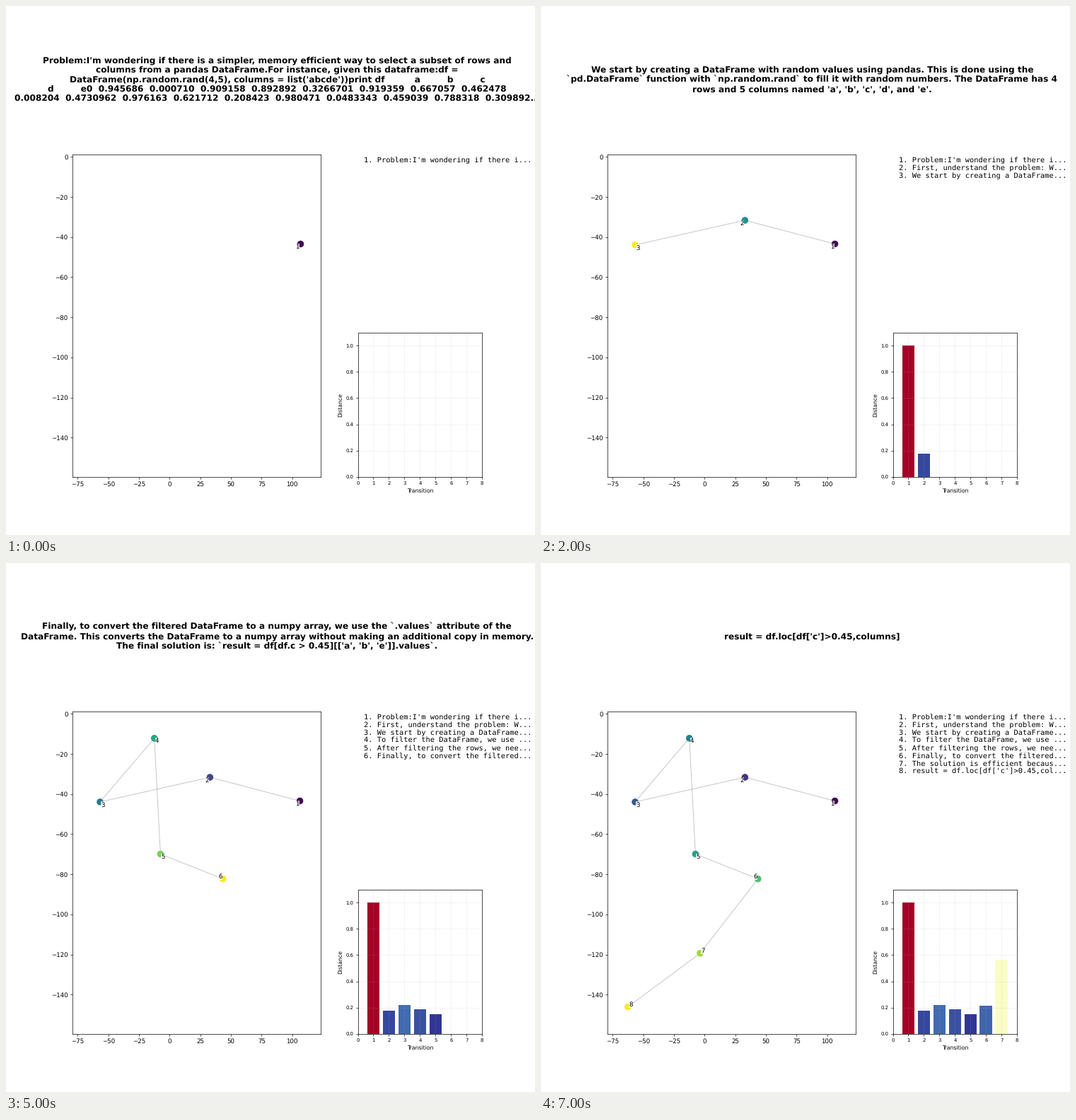
Recreate the animation shown at these times as a matplotlib script. Size 748x748 px, loop 8000 ms.

```python
import numpy as np
import matplotlib.pyplot as plt
from matplotlib.animation import FuncAnimation

SIDE = 748
np.random.seed(0)
plt.rcParams["font.family"] = "DejaVu Sans"
plt.rcParams["text.hinting"] = "none"

STEPS = [
    "Problem:I'm wondering if there is a simpler, memory efficient way to select a subset of rows and\n"
    "columns from a pandas DataFrame.For instance, given this dataframe:df =\n"
    "DataFrame(np.random.rand(4,5), columns = list('abcde'))print df          a         b         c\n"
    "d         e0  0.945686  0.000710  0.909158  0.892892  0.3266701  0.919359  0.667057  0.462478\n"
    "0.008204  0.4730962  0.976163  0.621712  0.208423  0.980471  0.0483343  0.459039  0.788318  0.309892...",
    "First, understand the problem: We have a DataFrame with random values and we need to filter rows\n"
    "where the value in column 'c' is greater than 0.45. After filtering, we only want to keep columns\n"
    "'a', 'b', and 'e'. Finally, the result should be converted to a numpy array for further processing.",
    "We start by creating a DataFrame with random values using pandas. This is done using the\n"
    "`pd.DataFrame` function with `np.random.rand` to fill it with random numbers. The DataFrame has 4\n"
    "rows and 5 columns named 'a', 'b', 'c', 'd', and 'e'.",
    "To filter the DataFrame, we use boolean indexing. The condition `df.c > 0.45` returns a mask\n"
    "of True and False values, and passing it to the DataFrame keeps only the rows where the\n"
    "value in column 'c' is greater than 0.45.",
    "After filtering the rows, we need to select only the columns 'a', 'b', and 'e'. We can directly\n"
    "specify the column names in the DataFrame selection: `df[df.c > 0.45][['a', 'b', 'e']]`. This gives\n"
    "us a DataFrame with the desired rows and columns.",
    "Finally, to convert the filtered DataFrame to a numpy array, we use the `.values` attribute of the\n"
    "DataFrame. This converts the DataFrame to a numpy array without making an additional copy in memory.\n"
    "The final solution is: `result = df[df.c > 0.45][['a', 'b', 'e']].values`.",
    "The solution is efficient because it selects the rows and columns in a single pass and avoids\n"
    "creating extra copies of the data. It uses only built-in pandas operations, so the code\n"
    "stays short and easy to read.",
    "result = df.loc[df['c']>0.45,columns]",
]
POINTS = np.array([(106.3, -43.4), (32.9, -31.6), (-56.8, -43.9), (-12.5, -12.1),
                   (-7.5, -69.9), (43.5, -82.3), (-3.7, -119.4), (-62.7, -146.2)])
# side of each dot its number sits on: (right, up)
SIDES = [(-1, 0), (-1, 0), (1, 0), (1, 0), (1, 0), (-1, 1), (1, 1), (1, 1)]
DIST = np.array([1.0, 0.175, 0.222, 0.188, 0.15, 0.214, 0.565])
BAR_COLORS = plt.cm.RdYlBu_r((DIST - DIST.min()) / np.ptp(DIST))

fig = plt.figure(figsize=(12, 12), dpi=SIDE / 12, facecolor="white")


def add_axes(left, top, right, bottom):
    return fig.add_axes([left / SIDE, 1 - bottom / SIDE,
                         (right - left) / SIDE, (bottom - top) / SIDE])


def put_text(x, y, text, **style):
    """Text with its baseline at pixel (x, y), counted from the top left."""
    return fig.text(x / SIDE, 1 - y / SIDE, text, va="baseline", **style)


path_ax = add_axes(93.5, 209.76, 444.83, 665.72)
path_ax.set(xlim=(-79.6, 123.2), ylim=(-159.6, 1.3),
            xticks=range(-75, 101, 25), yticks=range(-140, 1, 20))

bar_ax = add_axes(497.53, 461.76, 673.2, 665.72)
bar_ax.set(xlim=(0, 8), ylim=(0, 1.1), xticks=range(9), yticks=np.arange(6) / 5)
bar_ax.set_xlabel("Transition", fontsize=9)
bar_ax.set_ylabel("Distance", fontsize=9)
bar_ax.tick_params(labelsize=8)
bar_ax.grid(True, linestyle="--", alpha=0.3)

live = []


def reset():
    while live:
        live.pop().remove()
    return []


def draw_title(text):
    lines = text.split("\n")
    for k, line in enumerate(lines):
        y = 107.6 + 13.71 * (k - (len(lines) - 1) / 2)
        live.append(put_text(383.35, y, line, ha="center", fontsize=14, weight="bold"))


def draw_list(count):
    for k, text in enumerate(STEPS[:count]):
        brief = text.replace("\n", " ")[:32]
        live.append(put_text(506.3, 221.3 + 10.85 * k, f"{k + 1}. {brief}...",
                             fontsize=12, family="DejaVu Sans Mono"))


def draw_path(count):
    pts = POINTS[:count]
    live.extend(path_ax.plot(*pts.T, color="gray", alpha=0.5, lw=1, zorder=1))
    live.append(path_ax.scatter(*pts.T, s=100, zorder=2,
                                c=plt.cm.viridis(np.linspace(0, 1, count))))
    for k, (pt, (right, up)) in enumerate(zip(pts, SIDES)):
        live.append(path_ax.annotate(
            str(k + 1), pt, xytext=(4.6 * right, 1.3 if up else -7.8),
            textcoords="offset points", ha="center", va="baseline", fontsize=10,
            bbox=dict(facecolor="white", edgecolor="none", alpha=0.8, pad=0.3)))


def draw_bars(count):
    live.extend(bar_ax.bar(np.arange(1, count + 1), DIST[:count], width=0.8,
                           color=BAR_COLORS[:count]))
    bar_ax.set(xlim=(0, 8), ylim=(0, 1.1))


def update(step):
    reset()
    draw_title(STEPS[step])
    draw_list(step + 1)
    draw_path(step + 1)
    if step:
        draw_bars(step)
    return live


anim = FuncAnimation(fig, update, frames=len(STEPS), init_func=reset,
                     interval=1000, repeat=True, repeat_delay=0)
plt.show()
```
